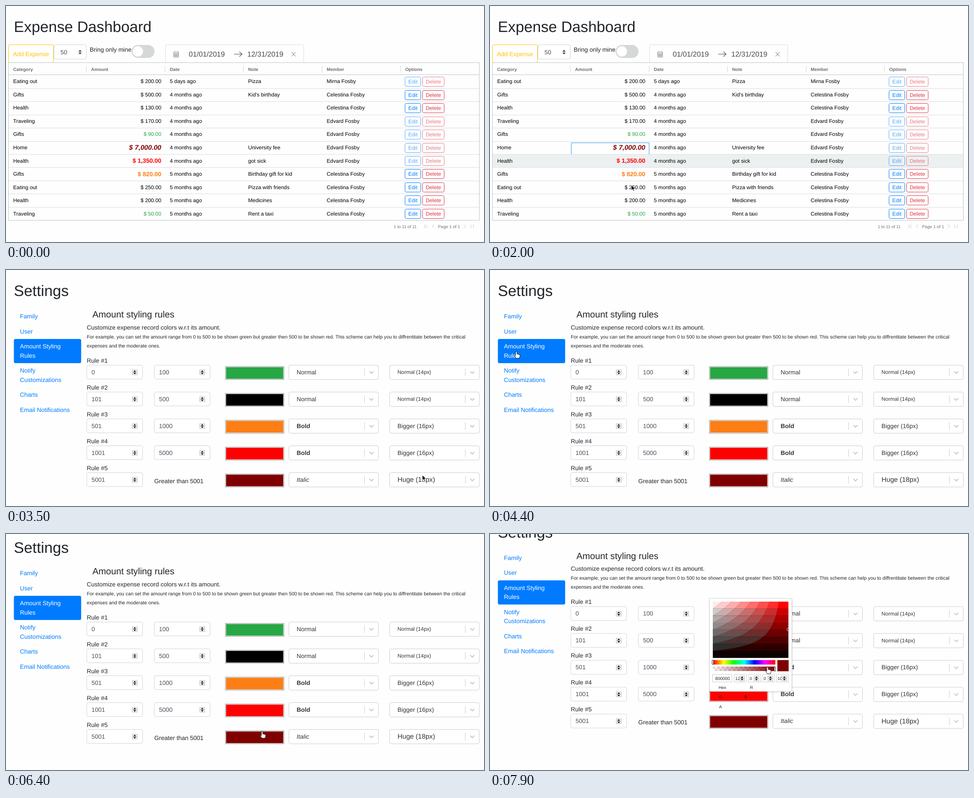
These frames come from a looping animation (1062 px wide and 527 px high, 8000 ms). An HTML page:

```html
<!DOCTYPE html>
<html lang="en">
<head>
<meta charset="utf-8">
<title>Expense Dashboard</title>
<style>
  html, body { margin: 0; width: 100%; height: 100%; overflow: hidden; background: #fefefe; }
  svg { display: block; width: 100vw; height: 100vh; }
  text { font-family: "Liberation Sans", Arial, sans-serif; text-rendering: geometricPrecision; white-space: pre; }
</style>
</head>
<body>
<svg id="stage" viewBox="0 0 1062 527"></svg>
<script>
// The page is shown zoomed out; font sizes are CSS pixels times the zoom.
const ZOOM = 0.843;
const [H1, H4, HUGE, BODY, SMALL, TINY] = [40, 24, 18, 16, 14, 12].map(px => px * ZOOM);
const INK = '#212529', FIELD = '#495057', BLUE = '#007bff', RED = '#dc3545';

const text = (x, y, string, size = BODY, fill = INK, attrs = '') =>
  `<text x="${x}" y="${y}" font-size="${size}" fill="${fill}" ${attrs}>${string}</text>`;
const rect = (x, y, w, h, fill, attrs = '') =>
  `<rect x="${x}" y="${y}" width="${w}" height="${h}" fill="${fill}" ${attrs}/>`;
const snap = v => Math.floor(v) + 0.5;
const frame = (x, y, w, h, color, radius = 3.5, fill = '#fff') =>
  rect(snap(x), snap(y), snap(x + w) - snap(x), snap(y + h) - snap(y), fill, `stroke="${color}" rx="${radius}"`);
const line = (d, color, width = 1, fill = 'none') =>
  `<path d="${d}" fill="${fill}" stroke="${color}" stroke-width="${width}"/>`;
const group = (id, content) => `<g id="${id}">${content}</g>`;

/* ---------- dashboard ---------- */

const rowTop = i => Math.round(154.2 + 29.47 * i);
const columns = { Category: 16, Amount: 189, Date: 364, Note: 538, Member: 712.5, Options: 887 };
const [mother, father, daughter] = ['Celestina Fosby', 'Edvard Fosby', 'Mirna Fosby'];
const expenses = [
  ['Eating out', 200, '5 days', 'Pizza', daughter],
  ['Gifts', 500, '4 months', "Kid's birthday", mother],
  ['Health', 130, '4 months', '', mother],
  ['Traveling', 170, '4 months', '', father],
  ['Gifts', 90, '4 months', '', father],
  ['Home', 7000, '4 months', 'University fee', father],
  ['Health', 1350, '4 months', 'got sick', father],
  ['Gifts', 820, '5 months', 'Birthday gift for kid', mother],
  ['Eating out', 250, '5 months', 'Pizza with friends', mother],
  ['Health', 200, '5 months', 'Medicines', mother],
  ['Traveling', 50, '5 months', 'Rent a taxi', mother],
];
// upper limit, from, color, font style, font size, style label, size label
const rules = [
  [100, 0, '#28a745', '', SMALL, 'Normal', 'Normal (14px)'],
  [500, 101, '#000', '', SMALL, 'Normal', 'Normal (14px)'],
  [1000, 501, '#fd7e14', 'font-weight="bold"', BODY, 'Bold', 'Bigger (16px)'],
  [5000, 1001, '#f00', 'font-weight="bold"', BODY, 'Bold', 'Bigger (16px)'],
  [Infinity, 5001, '#800000', 'font-style="italic"', HUGE, 'Italic', 'Huge (18px)'],
];

function amountCell(amount, y) {
  const [, , color, style, size] = rules.find(rule => amount <= rule[0]);
  const weight = size === HUGE ? 'font-weight="bold"' : '';
  const label = '$ ' + amount.toLocaleString('en-US') + '.00';
  return text(345, y, label, size, color, `text-anchor="end" ${style} ${weight}`);
}

const button = (x, y, w, label, color) =>
  frame(x, y, w, 21, color, 3, 'none') + text(x + w / 2, y + 14.6, label, SMALL, color, 'text-anchor="middle"');

function expenseRow([category, amount, age, note, member], i) {
  const y = 172.4 + 29.52 * i, buttonTop = rowTop(i) + 4.5;
  const opacity = member === mother ? 1 : 0.65;
  return text(16, y, category, SMALL, '#000') + amountCell(amount, y + (amount > 500 ? 0.6 : 0)) +
    text(364, y, age + ' ago', SMALL, '#000') + text(538, y, note, SMALL, '#000') +
    text(712.5, y, member, SMALL, '#000') +
    `<g opacity="${opacity}">` + button(886.5, buttonTop, 35, 'Edit', BLUE) +
    button(925.5, buttonTop, 48, 'Delete', RED) + '</g>' +
    rect(6, rowTop(i + 1), 1045, 1, '#d9dcde');
}

const toolbar =
  text(17.6, 58, 'Expense Dashboard', H1) +
  frame(5.5, 86.5, 100, 40, '#ffc107') + text(15.6, 111.8, 'Add Expense', BODY, '#ffc107') +
  frame(106.5, 86.5, 72, 32, '#ced4da') + text(121, 107.8, '50', BODY, FIELD) +
  line('M161 102l3.5-4 3.5 4zM161 104l3.5 4 3.5-4z', 'none', 0, '#343a40') +
  text(186, 101.7, 'Bring only mine') +
  rect(279, 87, 51, 29, '#d5d7d8', 'rx="14.5"') + '<circle cx="293" cy="101.3" r="11.5" fill="#fff"/>' +
  frame(354.5, 86.5, 307, 40, '#dbdbdb', 2) +
  line('M372.5 103h11v11h-11zM372.5 106.5h11M372.5 110h11M375.5 106v8M378 106v8M380.5 106v8M375 101v3M381 101v3', '#82888a') +
  text(406, 112.5, '01/01/2019', 19 * ZOOM, '#484848') + text(536, 112.5, '12/31/2019', 19 * ZOOM, '#484848') +
  line('M507 107.5h17M518.5 102l6 5.5-6 5.5', '#484848', 1.1) +
  line('M634.5 103l9 9.5m0-9.5l-9 9.5', '#666');

const tableHead = Object.entries(columns).map(([name, x], i) =>
  text(x, 145, name, TINY, '#6b6e70', 'font-weight="bold"') +
  (i ? rect(Math.round(x) - 11, 134, 1, 14, '#d0d3d6') : '')).join('') +
  rect(6, 153, 1045, 1, '#bdc3c7');

const pager =
  text(861.5, 496, '1 to 11 of 11', 9.4, '#6f7274') + text(959.7, 496, 'Page 1 of 1', 9.6, '#6f7274') +
  line('M930.5 488v8M937 488l-4 4 4 4M951 488l-4 4 4 4M1017 488l4 4-4 4M1031 488l4 4-4 4M1038.5 488v8', '#c4c8cb');

const dashboard = toolbar + rect(6, 0, 1045, 28, '#ecf0f1', 'id="hover"') + tableHead +
  expenses.map(expenseRow).join('') + frame(5.5, 126.5, 1046, 352, '#bdc3c7', 0, 'none') +
  '<path id="focus" d="M180.5 26V0.5H353.5V26" fill="none" stroke="#2f96e8"/>' + pager;

/* ---------- settings ---------- */

const spinner = (x, y) =>
  line(`M${x - 5.5} ${y - 5.5}h11v11h-11zM${x - 5.5} ${y}h11`, '#bbb', 1, '#f2f2f2') +
  line(`M${x - 3} ${y - 1}l3-3.6 3 3.6zM${x - 3} ${y + 1}l3 3.6 3-3.6z`, 'none', 0, '#111');

const numberInput = (x, y, value) =>
  frame(x, y - 16, 124, 31, '#ced4da') + text(x + 10.5, y + 4.8, value, BODY, FIELD) + spinner(x + 106.5, y + 0.5);

const dropdown = (x, y, label, size, style = '') =>
  frame(x, y - 16, 199, 32, '#ccc') + text(x + 17.3, y + size * 0.35, label, size, '#333', style) +
  rect(x + 167.5, y - 8, 1, 17, '#ccc') +
  line(`M${x + 179} ${y - 1.5}l4.5 4.5 4.5-4.5`, '#c4c4c4', 1.8);

function ruleRow([to, from, color, style, size, styleLabel, sizeLabel], i) {
  const y = Math.round(228 + 60.1 * i);
  return text(179.5, y - 21.4, 'Rule #' + (i + 1)) + numberInput(179.5, y, from) +
    (to < Infinity ? numberInput(329.5, y, to) : text(329.5, y + 7.5, 'Greater than 5001')) +
    frame(487.5, y - 12.5, 130, 29, '#8a8a8a', 0) + rect(489, y - 11, 127, 26, color) +
    dropdown(628.5, y, styleLabel, BODY, style) + dropdown(852.5, y, sizeLabel, size);
}

const link = (y, label, attrs = '', fill = BLUE) => text(31, y, label, BODY, fill, attrs);
const settings =
  text(17.6, 58, 'Settings', H1) +
  rect(17.5, 154, 149.5, 54, BLUE, 'rx="3.5"') +
  link(108, 'Family', 'id="family"') + link(141.7, 'User', 'id="user"') +
  link(175.4, 'Amount Styling', '', '#fff') + link(195.6, 'Rules', '', '#fff') +
  link(229.3, 'Notify') + link(249.5, 'Customizations') + link(283.2, 'Charts') + link(316.9, 'Email Notifications') +
  text(192, 106.3, 'Amount styling rules', H4) +
  text(179.5, 132.5, 'Customize expense record colors w.r.t its amount.') +
  text(179.5, 152.6, 'For example, you can set the amount range from 0 to 500 to be shown green but greater then 500 to be shown red. This scheme can help you to diffrentitate between the critical', BODY * 0.8) +
  text(179.5, 172.8, 'expenses and the moderate ones.', BODY * 0.8) +
  rules.map(ruleRow).join('');

/* ---------- color picker ---------- */

// Saturation/value field in 8 x 8 flat bands, bounded by curves of equal green.
function saturationField(x, y, w, h) {
  let out = rect(x, y, w, h, '#100');
  const edge = (level, v) => x + w * Math.min(1, Math.max(0, 1 - level / 8 / Math.max(v, 1e-6)));
  for (let row = 0; row < 8; row++) {
    const red = row ? 255 * (7.4 - row) / 8 : 255;
    for (let level = 0; level <= 7 - row; level++) {
      const left = [], right = [];
      for (let s = 0; s <= 6; s++) {
        const depth = (row + s / 6) / 8, py = y + h * depth;
        left.push([edge(level + 1, 1 - depth), py]);
        right.unshift([edge(level, 1 - depth), py]);
      }
      const green = level ? Math.min(red, 255 * (level + 0.4) / 8) : 0;
      out += `<polygon points="${[...left, ...right].join(' ')}" fill="rgb(${red},${green},${green})"/>`;
    }
  }
  return out;
}

const channel = (x, w, value) =>
  frame(x, 313.5, w, 17, '#ccc', 0) + text(x + 3, 325.7, value, 9.3, '#222') + spinner(x + w - 9, 322.5);
const handle = (x, y) => frame(x, y, 3, 10, '#222', 1.5);
const hues = [0, 60, 120, 180, 240, 300, 360].map(h => `<stop offset="${h / 360}" stop-color="hsl(${h},100%,50%)"/>`).join('');

const picker =
  `<defs><linearGradient id="hue">${hues}</linearGradient>
   <linearGradient id="alpha"><stop stop-color="#800000" stop-opacity="0"/><stop offset="1" stop-color="#800000"/></linearGradient>
   <pattern id="checks" width="10" height="10" x="495" y="296" patternUnits="userSpaceOnUse">
   <path d="M0 0h5v5H0zM5 5h5v5H5z" fill="#ddd"/></pattern></defs>` +
  rect(486, 143, 187, 212, '#000', 'opacity=".06" rx="4"') +
  frame(487.5, 143.5, 183, 208, '#d2d2d2', 3) +
  saturationField(495, 151, 168, 125.5) + line('M663 210a3 3 0 0 0 0 6.5', '#ddd') +
  rect(496, 281.5, 138, 10, 'url(#hue)') + handle(493.5, 281.5) +
  rect(495, 296, 139, 10, '#fff') + rect(495, 296, 139, 10, 'url(#checks)') + rect(495, 296, 139, 10, 'url(#alpha)') +
  handle(631.5, 296) + rect(638.5, 281.5, 25, 25, '#800000', 'stroke="#a88"') +
  frame(494.5, 313.5, 43, 17, '#ccc', 0) + text(500.5, 325.7, '800000', 9.7, '#222') +
  channel(542, 27, '12') + channel(574, 27, '0') + channel(605, 27, '0') + channel(636, 27, '10') +
  text(508, 345.6, 'Hex', 9.3, '#222') + text(577.5, 345.6, 'R', 9.3, '#222') +
  text(509, 367.4, 'G', 9.3, '#222') + text(565, 367.4, 'B', 9.3, '#222') + text(509, 389.3, 'A', 9.3, '#222');

/* ---------- assembly ---------- */

const arrow = 'M0 0V11.5L2.7 9 4.5 13.2 6.5 12.3 4.7 8.3H8.3Z';
const hand = 'M-1.6 1.5a1.6 1.6 0 0 1 3.2 0V5.5L6.4 6.5Q8 7 8 8.5V11L6.6 15H-.3L-4 9.8Q-4.3 8.2-2.8 8.4L-1.6 9.6Z';

const stage = document.getElementById('stage');
stage.innerHTML = group('dashboard', dashboard) + group('settings', settings) + group('picker', picker) +
  '<path id="cursor" stroke-width=".9"/>';
const el = id => document.getElementById(id);
const show = (id, visible) => el(id).setAttribute('display', visible ? 'inline' : 'none');

// Pointer keys: [tenth of a second, x, y]; hidden between the two trips.
const tableTrip = [[5, 318, 84], [7, 312, 165], [9, 305, 280], [11, 296, 343], [12, 288, 324], [13, 290, 320],
  [17, 300, 317], [18, 300, 317], [20, 314, 400], [21, 318, 446], [22, 318, 375], [23, 316, 288], [24, 316, 288], [25, 330, 160], [26, 345, 10]];
const settingsTrip = [[35, 925, 458], [37, 400, 215], [39, 58, 106], [40, 55, 130], [42, 59, 184], [43, 59, 184], [44, 58.5, 182],
  [45, 60, 184], [46, 60, 184], [48, 420, 270], [50, 884, 396], [53, 526, 359], [54, 526, 359], [56, 528, 420], [57, 528, 420],
  [60, 554, 476], [62, 572, 465], [64, 569, 441], [67, 548, 423], [70, 549, 422], [75, 549, 422], [79, 616.5, 297]];
const scrollKeys = [[62, 0], [63, 4], [64, 16], [65, 34], [66, 46], [67, 50.4]];

function sample(keys, step) {
  const next = keys.findIndex(key => key[0] >= step);
  if (next < 0) return keys[keys.length - 1].slice(1);
  if (next === 0) return keys[0].slice(1);
  const a = keys[next - 1], b = keys[next], f = (step - a[0]) / (b[0] - a[0]);
  return a.slice(1).map((v, i) => v + (b[i + 1] - v) * f);
}

function pointerAt(step) {
  if (step >= 5 && step <= 26) return sample(tableTrip, step);
  return step >= 35 ? sample(settingsTrip, step) : null;
}

function drawTable(step) {
  // Row highlight trails the pointer by one step.
  const previous = pointerAt(step) && pointerAt(step - 1);
  const row = previous ? Math.floor((previous[1] - 154) / 29.5) : -1;
  show('hover', row >= 0 && row < expenses.length);
  el('hover').setAttribute('y', rowTop(row) + 1);
  show('focus', step >= 14);
  el('focus').setAttribute('transform', `translate(0 ${rowTop(step < 24 ? 5 : 4) + 3})`);
}

function drawSettings(step, pointer) {
  const [scroll] = sample(scrollKeys, step);
  el('settings').setAttribute('transform', `translate(0 ${-scroll})`);
  [['family', 87], ['user', 120.5]].forEach(([id, top]) => {
    const over = pointer && pointer[0] < 167 && pointer[1] >= top && pointer[1] < top + 33.5;
    el(id).setAttribute('fill', over ? '#0056b3' : BLUE);
    el(id).setAttribute('text-decoration', over ? 'underline' : 'none');
  });
}

function render(now) {
  const step = Math.floor(now % 8000 / 100);
  const inSettings = step >= 32, pointer = pointerAt(step);
  show('dashboard', !inSettings);
  show('settings', inSettings);
  show('picker', step >= 75);
  if (inSettings) drawSettings(step, pointer);
  else drawTable(step);

  show('cursor', pointer);
  if (pointer) {
    const [x, y] = pointer;
    const clickable = inSettings && (x < 167 || (x > 487 && x < 618));
    const cursor = el('cursor');
    cursor.setAttribute('d', clickable ? hand : arrow);
    cursor.setAttribute('fill', clickable ? '#fff' : '#000');
    cursor.setAttribute('stroke', clickable ? '#000' : '#fff');
    cursor.setAttribute('transform', `translate(${x} ${y})`);
  }
  requestAnimationFrame(() => render(performance.now() - start));
}
const start = performance.now();
render(0);
</script>
</body>
</html>
```
